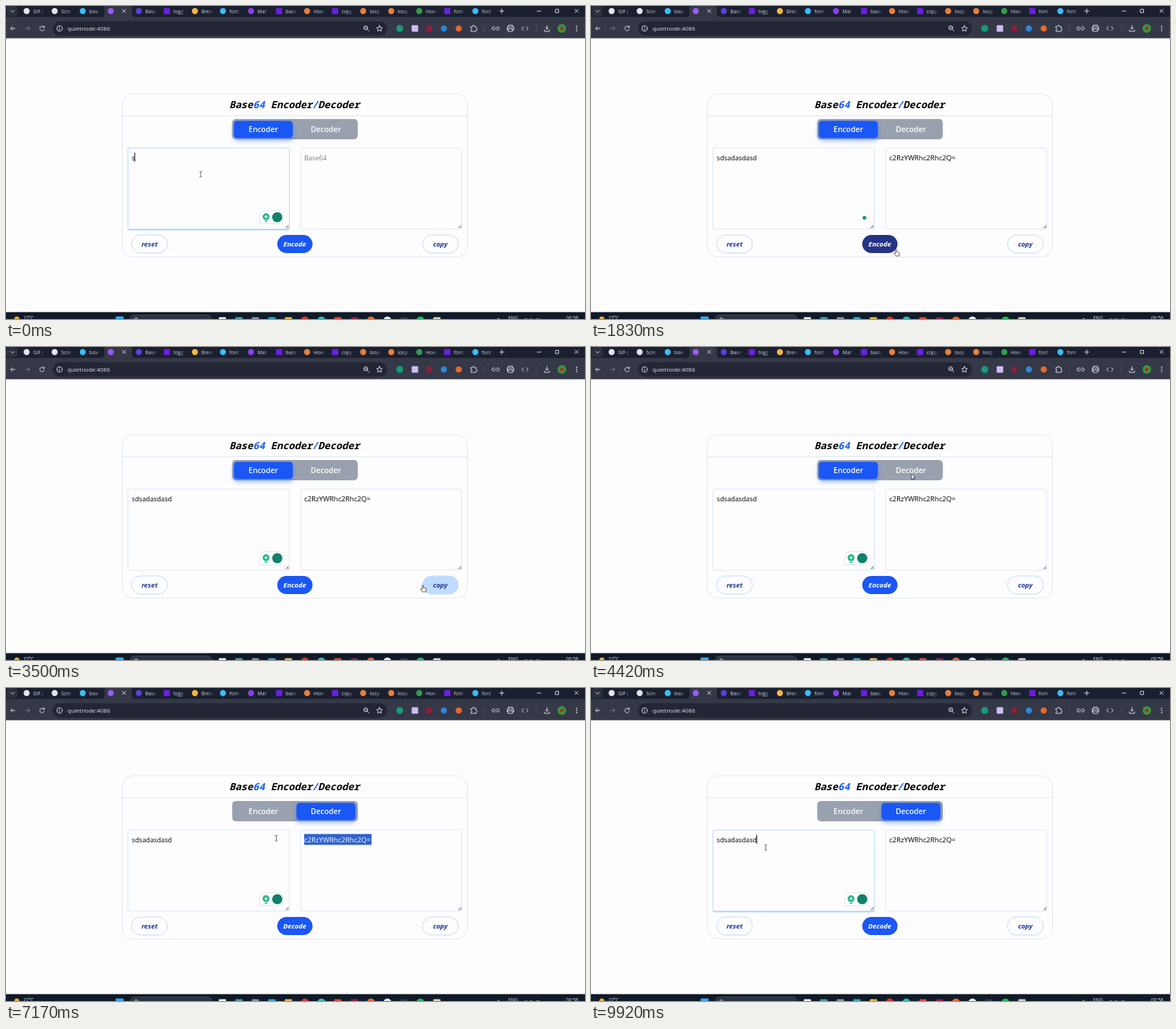
Animation of 800 by 432 pixels, one loop 10 s. Source, as an HTML page:

```html
<!DOCTYPE html>
<html lang="en">
<head>
<meta charset="utf-8">
<title>Base64 Encoder/Decoder</title>
<style>
html, body { margin: 0; width: 100%; height: 100%; overflow: hidden; background: #fdfdfe; }
svg { display: block; width: 800px; height: 432px; font-family: "Open Sans", "Noto Sans", sans-serif; }
filter { color-interpolation-filters: sRGB; }
.title { font: italic 700 13.65px "Noto Sans Mono", "DejaVu Sans Mono", monospace; }
.mode { font-size: 10.4px; font-weight: 600; fill: #fff; text-anchor: middle; }
.btn { font-size: 9.3px; font-weight: 700; font-style: italic; text-anchor: middle; fill: #1e3a9e; }
.box { fill: #fdfdfe; stroke: #dbe7f8; }
.pill { fill: #fdfdfe; stroke: #c3d9f8; }
.line { fill: none; stroke: #d4d7de; stroke-width: 1; stroke-linecap: round; stroke-linejoin: round; }
.tab { font-size: 6.8px; fill: #d5d8df; }
.bar { font-size: 6.6px; fill: #e6e9ee; }
</style>
</head>
<body>
<svg viewBox="0 0 800 432">
  <defs>
    <filter id="glow" x="-20%" y="-50%" width="140%" height="220%">
      <feDropShadow dx="0" dy="3.500" stdDeviation="3" flood-color="#2b6bff" flood-opacity=".55"/>
    </filter>
    <filter id="soft" x="-5%" y="-5%" width="110%" height="112%">
      <feDropShadow dx="0" dy="1" stdDeviation=".7" flood-color="#3b82f6" flood-opacity=".45"/>
    </filter>
    <linearGradient id="fade">
      <stop offset="0" stop-color="#1b2030" stop-opacity="0"/>
      <stop offset=".7" stop-color="#1b2030"/>
    </linearGradient>
    <clipPath id="selClip"><rect id="selArea" y="200" height="20"/></clipPath>
  </defs>
  <rect width="800" height="432" fill="#fdfdfe"/>

  <g id="chrome">
    <rect width="800" height="44.500" fill="#343847"/>
    <rect width="800" height="15" fill="#1b2030"/>
    <path d="M132 15q4 0 4-4V3q0-3 3-3h32q3 0 3 3v8q0 4 4 4z" fill="#343847"/>
    <rect x="1" y="0" width="15" height="14" rx="4" fill="#2c3140"/>
    <rect x="64.500" y="21" width="462" height="20" rx="10" fill="#222635"/>
    <g class="line">
      <path d="M6.500 6l2.500 2.500 2.500-2.500M161 4.500l4.500 4.500m0-4.500l-4.500 4.500M682 7h6m-3-3v6"/>
      <path d="M734 7h5M760 4.500h3.500v4.500h-4.500v-3.500zM786 4.500l4.500 4.500m0-4.500l-4.500 4.500"/>
      <path d="M12.500 31h-6m2.500-2.500L6.500 31 9 33.500M52.500 29a3.200 3.200 0 1 0 .5 3m0-4.500v2h-2"/>
      <path d="M27 31h6m-2.500-2.500L33 31l-2.500 2.500" stroke="#777e8b"/>
      <circle cx="74" cy="31" r="3.700"/><path d="M74 30.800v1.800m0-3.800v.1"/>
      <circle cx="497" cy="30" r="2.700"/><path d="M499.200 32.200l2.300 2.300m-5.700-4.500h2.400"/>
      <path d="M516 27l1.200 2.600 2.800.4-2.100 1.900.6 2.800-2.500-1.400-2.500 1.400.6-2.800-2.100-1.900 2.800-.4z"/>
      <path d="M642.500 28.500h2q0-2 1.500-2t1.500 2h2v2.500q1.500 0 1.500 1.300t-1.500 1.200v1.500h-7v-2q1.300 0 1.300-1.200t-1.300-1.300z"/>
      <path d="M675 29h-1.500a2 2 0 0 0 0 4h1.500m3-4h1.500a2 2 0 0 1 0 4H678m-3-2h3"/>
      <path d="M694 29v-2.500h6V29m-6 4h-1.500v-4h9v4H700m-6-1.500h6V35h-6z"/>
      <path d="M715 28.500L712.500 31l2.500 2.500m4-5l2.500 2.500-2.500 2.500"/>
      <path d="M747.500 27v5m-2-2l2 2 2-2m-5.500 3v2h7v-2"/>
      <path d="M661 27v8M733 27v8" stroke="#4d5362"/>
    </g>
    <text x="85" y="34" font-size="8" fill="#e4e7ec">quietnode:4086</text>
    <circle cx="768" cy="31" r="6" fill="#3a963c"/>
    <circle cx="768" cy="31" r="2.500" fill="#a8322c"/>
    <g fill="#d4d7de"><circle cx="788.500" cy="28" r=".9"/><circle cx="788.500" cy="31" r=".9"/><circle cx="788.500" cy="34" r=".9"/></g>
  </g>

  <g id="taskbar">
    <rect y="422.500" width="800" height="10" fill="#101a28"/>
    <circle cx="15" cy="432" r="3.500" fill="#e8b13a"/>
    <rect x="171.500" y="426.500" width="113" height="14" rx="6" fill="#2a3442" stroke="#3d4856"/>
    <circle cx="180" cy="433" r="2.500" class="line"/>
    <text class="bar" x="24" y="433">27°C</text>
    <text class="bar" x="694" y="433">ENG</text>
    <text class="bar" x="774" y="433">00:58</text>
    <path class="line" d="M678 433l2.500-2 2.500 2M717 432h3m4 0h3m6 0h4"/>
  </g>

  <rect x="160.500" y="121" width="477" height="225.500" rx="15" fill="#fdfdfe" stroke="#dfe7f4"/>
  <path d="M160.500 151.500h477" stroke="#dfe7f4"/>
  <text class="title" x="308.500" y="140.700" xml:space="preserve">Base<tspan fill="#155dfc">64</tspan> Encoder<tspan fill="#155dfc">/</tspan>Decoder</text>

  <rect x="312.500" y="156" width="173.500" height="28" rx="5" fill="#9aa1ae"/>
  <rect id="knob" y="158.500" width="81.500" height="23.500" rx="4.500" fill="#1a57f5" filter="url(#glow)"/>
  <text class="mode" x="355.500" y="174">Encoder</text>
  <text class="mode" x="442" y="174">Decoder</text>

  <rect id="input" class="box" x="168.500" y="196" width="223" height="112" rx="2"/>
  <rect class="box" x="407" y="196" width="222.500" height="112" rx="2"/>
  <path d="M386.500 306.500l4-4m-1.500 4l1.500-1.500M625 306.500l4-4m-1.500 4l1.500-1.500" stroke="#444" stroke-width=".9"/>
  <text id="plain" x="173.800" y="212.700" font-size="9.200">s</text>
  <rect id="caret" y="202.500" width="1" height="12.500" fill="#000"/>
  <text id="hint" x="412" y="212.700" font-size="9.200" fill="#7c7f86">Base64</text>
  <g id="result" font-size="9.650">
    <text x="412" y="212.700">c2RzYWRhc2Rhc2Q=</text>
    <g clip-path="url(#selClip)">
      <rect x="412" y="201.500" width="93" height="15" fill="#2f63cd"/>
      <text x="412" y="212.700" fill="#fff">c2RzYWRhc2Rhc2Q=</text>
    </g>
  </g>

  <g id="helper">
    <path d="M359 282.500h16q8.500 0 8.500 9t-8.500 9h-24.500v-9q0-9 8.500-9z" fill="#fff" stroke="#e1e4e9"/>
    <circle cx="359.300" cy="290.800" r="4.800" fill="#27b98c"/>
    <path d="M357.500 297h3.600" stroke="#27b98c" stroke-width="1.600"/>
    <path d="M359.300 288.500v4.600m-2.300-2.300h4.600" stroke="#fff"/>
    <circle cx="374.800" cy="291.500" r="7" fill="#11806a"/>
  </g>
  <circle id="dot" cx="377.800" cy="292.300" r="2.600" fill="#149a72"/>

  <rect class="pill" x="173.500" y="316" width="49.500" height="25" rx="12.500"/>
  <text class="btn" x="198.300" y="332">reset</text>
  <rect id="go" x="374.800" y="316" width="48.700" height="25" rx="12.500"/>
  <text id="goText" class="btn" x="399" y="332" style="fill:#fff">Encode</text>
  <rect id="copy" class="pill" x="575.500" y="316" width="49.500" height="25" rx="12.500"/>
  <text class="btn" x="600" y="332">copy</text>

  <g id="pointer">
    <path id="beam" d="M-1.800-3.500h1.300l.5.500.5-.5h1.300M0-3v6.500M-1.800 4h1.300l.5-.5.5.5h1.300" fill="none" stroke="#444" stroke-width=".8"/>
    <path id="arrow" d="M0 0v7.500l1.800-1.600 1.200 2.700 1.200-.5L3 5.500h2.400z" fill="#fff" stroke="#222" stroke-width=".7"/>
    <path id="hand" d="M-.8.700q.8-1.200 1.600 0v3.200l3.200.8q1 .3.800 1.500L4.200 9.500H-.3l-2.800-3.700q.6-1.200 2.300.2z" fill="#fff" stroke="#222" stroke-width=".7"/>
  </g>
</svg>
<script>
const $ = id => document.getElementById(id);
const NS = 'http://www.w3.org/2000/svg';

function add(parent, tag, attrs, text) {
  const el = document.createElementNS(NS, tag);
  for (const k in attrs) el.setAttribute(k, attrs[k]);
  if (text) el.textContent = text;
  $(parent).append(el);
}
const disc = (parent, cx, cy, r, fill) => add(parent, 'circle', { cx, cy, r, fill });
const tile = (parent, x, y, s, fill) =>
  add(parent, 'rect', { x: x - s / 2, y: y - s / 2, width: s, height: s, rx: 1, fill });

// Browser tabs: label and icon colour; long labels fade out
const violet = '#6a1ee0', sky = '#38bdf8', amber = '#e8803a';
[['GIF (', '#e2e5ea'], ['Scre', '#dfe5ee'], ['box-', sky], ['', '#9a5cf5'], ['Base', '#5b3fe0'],
 ['togg', violet], ['Breez', '#f3b73d'], ['font', sky], ['Mat', '#8a3ff0'], ['base', violet],
 ['How', amber], ['copy', violet], ['loop', amber], ['loop', amber], ['How', '#2f9d4e'],
 ['font', violet], ['font', sky]].forEach(([label, color], i) => {
  const x = 28.5 + i * 38.75;
  if (color === violet) tile('chrome', x, 7, 8.5, color);
  else disc('chrome', x, 7, 4.2, color);
  if (!label) return;
  add('chrome', 'text', { class: 'tab', x: x + 9, y: 9.5 }, label);
  add('chrome', 'rect', { x: x + 17, y: 2, width: 12, height: 11, fill: 'url(#fade)' });
});

disc('chrome', 544, 31, 4.8, '#159c78');
tile('chrome', 565, 31, 9, '#cdbdf3');
tile('chrome', 584.5, 31, 8, '#8c1f3c');
disc('chrome', 605, 31, 4.3, '#2f86d8');
disc('chrome', 625.5, 31, 4.3, '#e5692c');

tile('taskbar', 157, 434, 11, '#39a9ee');
['#f1f3f5', '#4f9aa8', '#8b949e', '#3aa5c4', '#e3bd55', '#d9382f', '#35b9b3', '#dd4b35',
 '#8c2448', '#e36b35', '#e8ebee', '#343c48', '#27b45a', '#d9d2c6'].forEach((color, i) => {
  const x = 299 + i * 22.8;
  if ([5, 6, 9, 10, 12].includes(i)) disc('taskbar', x, 434, 5.5, color);
  else tile('taskbar', x, 434.5, 10, color);
});

// Pointer path: time, x, y
const path = [
  [0, 269, 232], [700, 269, 232], [1500, 410, 329], [1830, 421.5, 335.5], [2100, 421.5, 335.5],
  [2800, 600, 330], [3200, 596, 330], [3500, 575.8, 328.5], [4500, 440, 172], [5000, 436, 172],
  [5420, 408.5, 178], [6100, 508, 209], [6300, 508, 209], [7170, 373.5, 207], [7900, 373.5, 207],
  [8670, 392.7, 214], [9400, 250, 217], [9920, 241.5, 220], [10000, 241.5, 220]
];

function pointerAt(t) {
  const i = path.findIndex((p, k) => k && t <= p[0]);
  const [t0, x0, y0] = path[i - 1], [t1, x1, y1] = path[i];
  const u = (t - t0) / (t1 - t0), e = u * u * (3 - 2 * u);
  return [x0 + (x1 - x0) * e, y0 + (y1 - y0) * e];
}

const inside = (x, y, l, r, top, bottom) => x >= l && x <= r && y >= top && y <= bottom;
const show = (id, on) => $(id).setAttribute('visibility', on ? 'visible' : 'hidden');
const set = (id, key, value) => $(id).setAttribute(key, value);

const LOOP = 10000, STEP = LOOP / 120;
const ENCODE = 1660, DECODE = 4700, DRAG = 6300, REFOCUS = 9450;

function render(t) {
  const [x, y] = pointerAt(t);
  const onGo = inside(x, y, 375, 423, 316, 341);
  const onCopy = inside(x, y, 575.5, 625, 316, 341);
  const onReset = inside(x, y, 173, 223, 316, 341);
  const onText = inside(x, y, 169, 392, 196, 308) || inside(x, y, 407, 630, 196, 308);
  const onButton = onGo || onCopy || onReset;
  set('pointer', 'transform', `translate(${x} ${y})`);
  show('beam', onText);
  show('hand', onButton);
  show('arrow', !onText && !onButton);

  $('plain').textContent = 'sdsadasdasd'.slice(0, 1 + Math.floor(t / 95));
  const focused = t < ENCODE || t >= REFOCUS;
  const blink = t < ENCODE ? t < 1500 : (t - REFOCUS) % 1000 < 500;
  show('caret', focused && blink);
  set('caret', 'x', 173 + $('plain').getComputedTextLength());
  $('input').style.stroke = focused ? '#bcd9fc' : '';
  set('input', 'filter', focused ? 'url(#soft)' : 'none');

  show('hint', t < ENCODE);
  show('result', t >= ENCODE);
  const from = t >= DRAG && t < REFOCUS ? (t < 7170 ? Math.min(505, Math.max(412, x)) : 412) : 505;
  set('selArea', 'x', from);
  set('selArea', 'width', 505 - from);

  const blurred = t >= ENCODE && t < 2050;
  show('helper', !blurred);
  show('dot', blurred);

  set('knob', 'x', t < DECODE ? 314.8 : 401.3);
  $('goText').textContent = t < DECODE ? 'Encode' : 'Decode';
  set('go', 'fill', onGo ? '#263486' : '#1a57f5');
  $('copy').style.fill = onCopy ? '#bfdbfe' : '';
}

function tick() {
  const t = performance.now() % LOOP;
  render(Math.min(LOOP, Math.floor((t + 4) / STEP) * STEP));
  requestAnimationFrame(tick);
}
tick();
</script>
</body>
</html>
```
